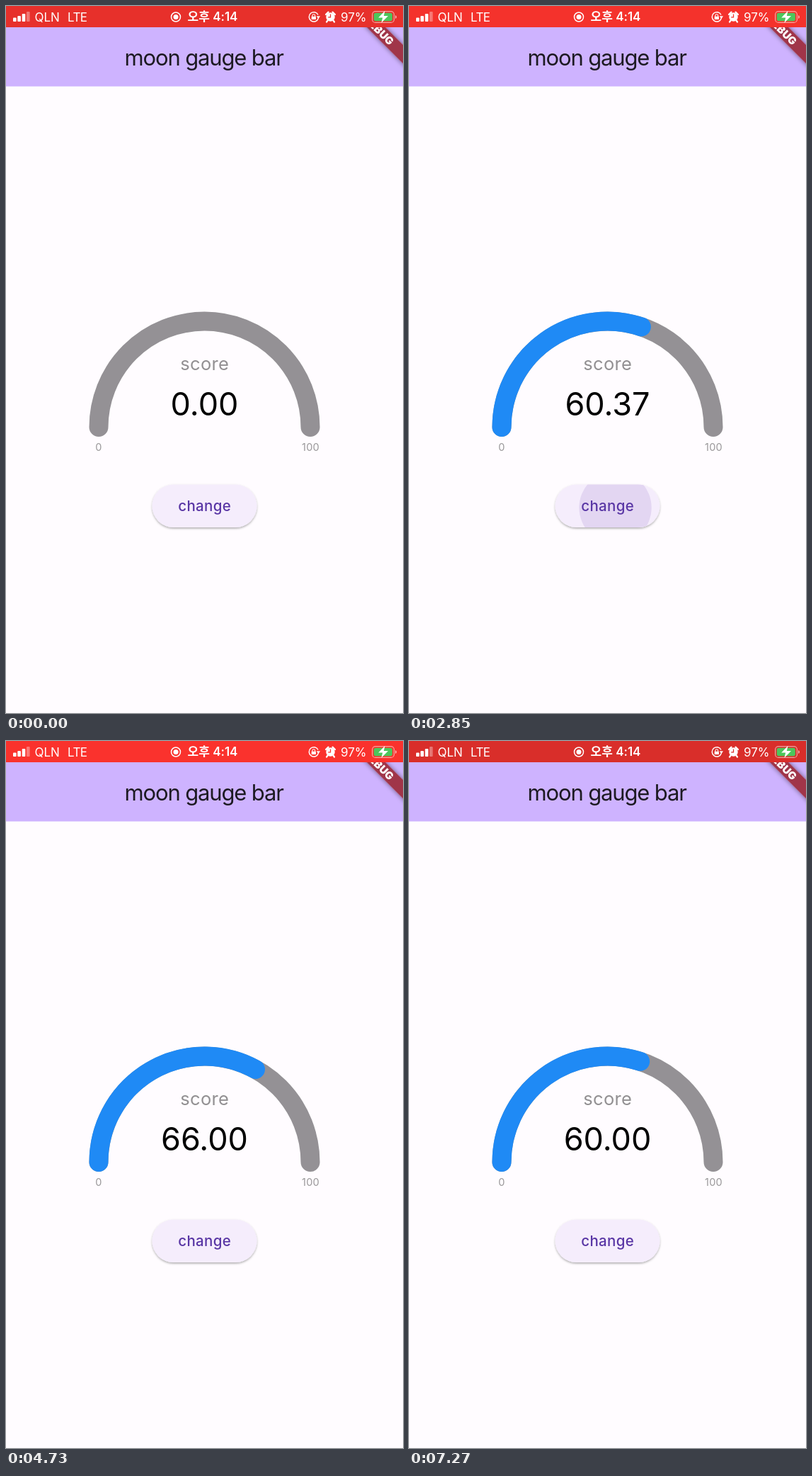
Recreate the animation shown at these times as an HTML page. Size 561 by 998 pixels, loop 7.3 s.

```html
<!DOCTYPE html>
<html lang="ko">
<head>
<meta charset="utf-8">
<title>Gauge bar</title>
<style>
  html, body { margin: 0; width: 100%; height: 100%; overflow: hidden; background: #fffcff; }
  svg { display: block; width: 561px; height: 998px; }
  text { font-family: Inter, "Noto Sans CJK KR", "Noto Sans CJK", sans-serif; font-optical-sizing: none; }
  .mid { text-anchor: middle; }
  .status text { font-size: 17px; fill: #fff; }
  .arc { fill: none; stroke-width: 27; stroke-linecap: round; }
</style>
</head>
<body>
<svg viewBox="0 0 561 998">
  <defs>
    <clipPath id="pill"><rect x="206.5" y="675.5" width="148" height="60.5" rx="30.25"/></clipPath>
    <filter id="lift" x="-10%" y="-20%" width="120%" height="150%">
      <feDropShadow dx="0" dy="1.6" stdDeviation="1.5" flood-color="#000" flood-opacity=".32"/>
    </filter>
    <filter id="shade" x="-20%" y="-60%" width="140%" height="220%">
      <feDropShadow dx="0" dy="0" stdDeviation="3.5" flood-color="#000" flood-opacity=".5"/>
    </filter>
  </defs>

  <rect width="561" height="998" fill="#fffcff"/>
  <rect y="30" width="561" height="83.5" fill="#ceb3ff"/>
  <text class="mid" x="279.7" y="83.5" font-size="31" letter-spacing="-1.15" fill="#1d1a22">moon gauge bar</text>

  <g transform="translate(527 34) rotate(45)">
    <rect x="-90" y="-9.3" width="180" height="18.6" fill="#a03549" filter="url(#shade)"/>
    <text class="mid" y="5.5" font-size="15" font-weight="900" fill="#fff">DEBUG</text>
  </g>

  <g class="status">
    <rect id="bar" width="561" height="30"/>
    <g fill="#fff">
      <rect x="10" y="16.5" width="4.6" height="5.5" rx="1"/>
      <rect x="16.3" y="14" width="4.6" height="8" rx="1"/>
      <rect x="22.7" y="11" width="4.6" height="11" rx="1"/>
      <rect x="29" y="8" width="4.6" height="14" rx="1" opacity=".35"/>
      <circle cx="240" cy="15.5" r="3.5"/>
    </g>
    <text x="40.5" y="21.5">QLN</text>
    <text x="87" y="21.5" letter-spacing="-.6">LTE</text>
    <circle cx="240" cy="15.5" r="6.5" fill="none" stroke="#fff" stroke-width="1.5"/>
    <text class="mid" x="292" y="21.3" font-weight="600">오후 4:14</text>

    <g fill="none" stroke="#fff" stroke-width="1.5">
      <path d="M441 12.5A6.7 6.7 0 1 0 441.3 17.5"/>
      <path d="M432.9 15v-1.3a1.9 1.9 0 0 1 3.8 0V15" stroke-width="1.1"/>
    </g>
    <path d="M431.7 14.7h6.2v4.4h-6.2zM438.8 14.2h5.2l-2.6 4z" fill="#fff"/>

    <circle cx="458.5" cy="15.5" r="6.2" fill="#fff"/>
    <path d="M452 12l3.5-3.4M465 12l-3.5-3.4M454.5 20.5l-1.5 2M462.5 20.5l1.5 2" stroke="#fff" stroke-width="2.2" stroke-linecap="round"/>
    <path id="hands" d="M458.5 11.5v4.3h-3.3" fill="none" stroke-width="1.3"/>

    <text x="473" y="21.5">97%</text>
    <rect x="517.6" y="7.6" width="30.8" height="15.8" rx="4.5" fill="none" stroke="#fff" stroke-opacity=".55" stroke-width="1.2"/>
    <rect x="519.7" y="9.7" width="26.2" height="11.6" rx="2.8" fill="#4cc65b"/>
    <path d="M550 13v5q2-.7 2-2.5t-2-2.5" fill="#fff" opacity=".6"/>
    <path d="M535.5 6.8l-9.3 9.7h6l-1.8 7.2 9.6-9.7h-6.2z" fill="#fff"/>
  </g>

  <path class="arc" d="M131 594.5a149.5 149.5 0 0 1 299 0" stroke="#949195"/>
  <path class="arc" id="fill" stroke="#1f8af5"/>
  <text class="mid" x="280.8" y="514" font-size="25.5" letter-spacing=".3" fill="#929092">score</text>
  <text class="mid" id="score" x="280.5" y="578" font-size="45" fill="#000"></text>
  <g class="mid" font-size="14.5" letter-spacing=".3" fill="#9a989a">
    <text x="131" y="628">0</text>
    <text x="430.5" y="628">100</text>
  </g>

  <rect x="206.5" y="675.5" width="148" height="60.5" rx="30.25" fill="#f5edfc" filter="url(#lift)"/>
  <g clip-path="url(#pill)"><circle id="ripple" fill="#e3d6f2"/></g>
  <text class="mid" x="280.7" y="713" font-size="20.5" font-weight="500" letter-spacing=".3" fill="#5936a5">change</text>
</svg>
<script>
  const LOOP = 7300, RUN = 500;
  // Each tap: time in ms, new score
  const taps = [[500, 57], [2752, 74], [3500, 66], [5172, 88], [6720, 60]];
  const el = id => document.getElementById(id);
  const set = (id, attrs) => { for (const k in attrs) el(id).setAttribute(k, attrs[k]); };
  const clamp = x => Math.max(0, Math.min(1, x));
  const mix = (a, b, p) => a + (b - a) * p;

  function scoreAt(t) {
    let value = 0;
    for (const [start, goal] of taps) value = mix(value, goal, clamp((t - start) / RUN));
    return value;
  }

  function drawGauge(value) {
    const a = Math.PI * (1 - value / 100);
    const x = 280.5 + 149.5 * Math.cos(a), y = 594.5 - 149.5 * Math.sin(a);
    set('fill', {
      d: `M131 594.5A149.5 149.5 0 0 1 ${x} ${y}`,
      visibility: value > 0 ? 'visible' : 'hidden'
    });
    el('score').textContent = value.toFixed(2);
  }

  function drawRipple(t) {
    const tap = taps.find(([start]) => t >= start - 20 && t < start + 440);
    const age = tap ? t - tap[0] : 440;
    const p = clamp((age + 20) / 245);
    set('ripple', {
      cx: mix(302, 280.5, p), cy: mix(710, 706, p), r: mix(22, 82, p),
      opacity: clamp((440 - age) / 150)
    });
  }

  function drawStatus(t) {
    const glow = (1 - Math.cos((t - 1520) / 1000 * Math.PI)) / 2;
    const red = `rgb(${mix(210, 255, glow)},${mix(45, 51, glow)},${mix(41, 45, glow)})`;
    set('bar', { fill: red });
    set('hands', { stroke: red });
  }

  function frame() {
    const t = performance.now() % LOOP;
    drawGauge(scoreAt(t));
    drawRipple(t);
    drawStatus(t);
    requestAnimationFrame(frame);
  }
  frame();
</script>
</body>
</html>
```
